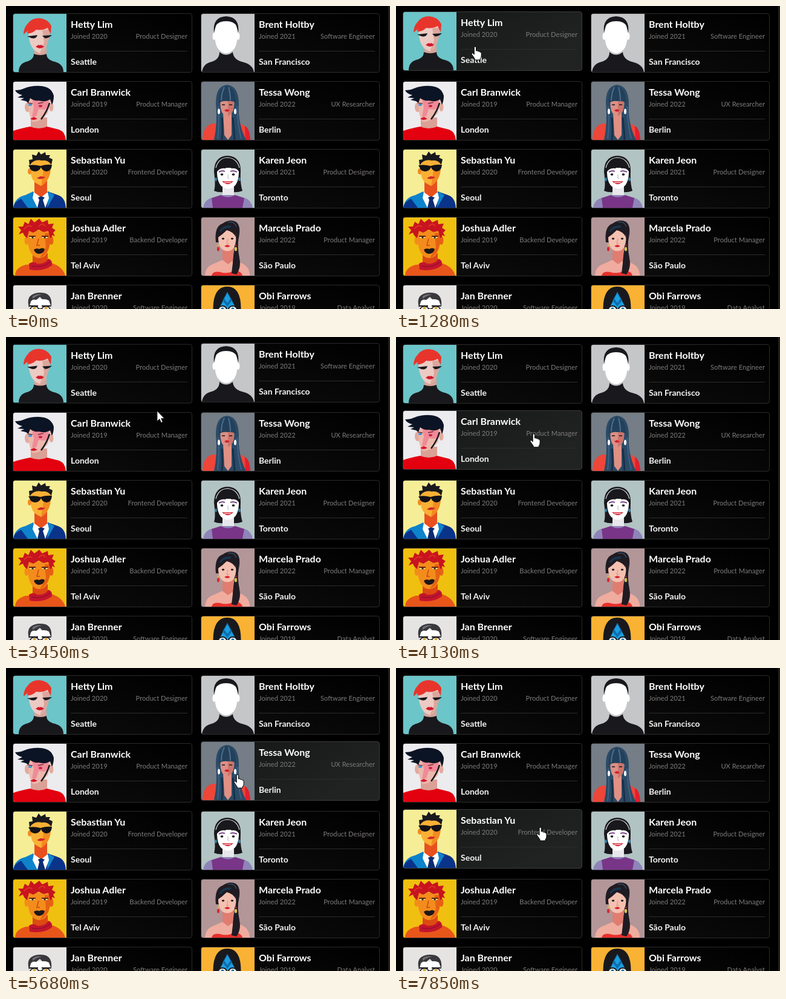
Animation of 635 by 500 pixels, one loop 8 s. Source, as an HTML page:

```html
<!DOCTYPE html>
<html lang="en">
<head>
<meta charset="utf-8">
<title>Team</title>
<style>
html, body { margin: 0; width: 100%; height: 100%; overflow: hidden; background: #000; }
svg { display: block; font-family: Lato, sans-serif; }
.name { font-size: 16px; font-weight: 700; fill: #fff; }
.note { font-size: 11.2px; fill: #7e7a7a; }
.city { font-size: 14px; font-weight: 700; fill: #f4f4f4; }
</style>
</head>
<body>
<svg id="stage" width="635" height="500" viewBox="0 0 635 500">
  <defs>
    <linearGradient id="rest" x1="0" y1="1" x2="1" y2="0">
      <stop stop-color="#0e0e0e"/><stop offset="1" stop-color="#000"/>
    </linearGradient>
    <linearGradient id="lit" x1="0.2" y1="0" x2="1" y2="0.5">
      <stop stop-color="#161818"/><stop offset="1" stop-color="#202322"/>
    </linearGradient>
    <clipPath id="photo"><path d="M100 13H15Q12 13 12 16V106Q12 109 15 109H100Z"/></clipPath>
  </defs>
  <rect width="635" height="500"/>
  <rect x="632" width="3" height="500" fill="#1d1f1e"/>
  <g id="cards"></g>
  <g id="cursor" fill="#fff" stroke="#000" stroke-linejoin="round">
    <path id="arrow" d="M0 0V17L4 13.3L6.7 19.3L9.3 18.2L6.7 12.3H12Z" stroke-width=".8"/>
    <path id="hand" d="M-2 13V1.5Q-2 0 -.4 0T1.3 1.5V7Q4 5.8 4.4 8Q7 7 7.4 9Q10 8.4 10 11V15Q10 18 8 20V22H-1V20L-6 12.8Q-6.8 11.3 -5 10.5Q-3.5 10.5 -2 13Z"/>
  </g>
</svg>
<script>
const LOOP = 8000, LIFT = 3, EASE = 600, DX = 311, DY = 112;
const $ = id => document.getElementById(id);

// drawing helpers for the portraits; coordinates are those of the first card
const p = (fill, d) => `<path fill="${fill}" d="${d}"/>`;
const l = (stroke, w, d) => `<path fill="none" stroke="${stroke}" stroke-width="${w}" d="${d}"/>`;
const e = (fill, x, y, rx, ry = rx) => `<ellipse fill="${fill}" cx="${x}" cy="${y}" rx="${rx}" ry="${ry}"/>`;
const bg = fill => p(fill, 'M12 13H100V109H12Z');
const ink = '#19191d';

const portraits = [
  bg('#6cc5c9') + p('#d9a398', 'M47 64H67V84H47Z') +
    p('#ebcbc4', 'M37 40Q37 64 48 74L56 78Q70 70 72 42L68 32H45Z') +
    p('#dca69c', 'M60 40L73 38Q72 66 56 78L63 60Z') +
    p('#e8352c', 'M29 47Q29 36 36 29Q42 20 55 20Q69 21 75 33L74 46Q71 41 69 36Q60 41 50 39Q43 46 35 45L36 41Q32 44 29 47Z') +
    p(ink, 'M35 50L52 48Q50 55 42 53ZM60 49L76 48Q70 54 64 53Z') +
    p('#d0182c', 'M49 67L54 64L56 65L58 64L63 67Q56 73 49 67Z') +
    p(ink, 'M21 109Q21 96 33 92Q46 89 46 79Q57 83 67 79Q67 89 81 92Q95 96 95 109Z'),

  bg('#c5c6c8') + p('#fff', 'M34 36Q33 66 42 73Q53 83 64 73Q73 66 72 36L66 24H40Z') +
    e('#fff', 33, 50, 2.5, 6) + e('#fff', 73, 50, 2.5, 6) +
    p(ink, 'M33 44Q30 18 53 17Q76 18 73 44L70 33Q66 25 53 25Q40 25 36 33Z') +
    p(ink, 'M13 109Q15 95 29 92Q42 88 42 76Q53 85 64 76Q65 88 79 92Q97 96 99 109Z'),

  bg('#ecebee') + p('#dba096', 'M41 72H68V95H41Z') + e('#e2aa9e', 36, 55, 5, 8) + e('#e2aa9e', 75, 55, 3.5, 7) +
    p('#ebb9ad', 'M37 40Q36 68 44 79Q55 81 69 65L75 42Z') +
    p('#f08a98', 'M43 42L69 40Q74 55 64 59L54 58L50 70L43 71L46 55Z') +
    p('#0b1424', 'M15 27Q24 27 30 24Q43 19 57 20Q75 21 79 36Q79 45 76 51L73 42Q66 47 54 44Q46 45 40 40L37 48L33 45L24 43L30 40L19 39L27 35Q18 33 15 27Z') +
    l(ink, 2.6, 'M72 48Q68 62 58 75') + e('#2b96d8', 40, 51, 3, 1.8) + e('#c41c3c', 57, 53, 3, 1.8) +
    l('#77333e', 1.3, 'M36 48L44 49M53 49L62 47') +
    p('#d8182c', 'M40 74L46 71L52 74Q45 78 40 74Z') +
    p('#e3000f', 'M12 109V94Q24 90 40 87Q54 93 68 87L88 92Q98 96 99 109Z'),

  bg('#757d86') + p('#ee4638', 'M14 109Q14 87 30 82H76Q92 87 93 109Z') +
    p('#e31e2d', 'M84 86Q92 90 93 109H85Z') +
    p('#2b4a66', 'M33 109Q39 82 36 48Q36 20 54 18Q73 19 74 48Q72 82 86 109Z') +
    p('#e09084', 'M48 64H62V101L56 109L50 101Z') + p('#dc8f85', 'M44 39H66Q68 60 60 67Q54 72 48 66Q42 60 44 39Z') +
    p('#c9756c', 'M56 44H66Q68 62 56 70Z') +
    p('#23405a', 'M41 49Q39 23 54 20Q70 23 69 49Q66 44 55 45Q45 44 41 49Z') +
    l('#4a6f8f', 2, 'M50 22Q45 32 45 44M57 22Q60 32 60 44') + l('#3d6285', 2, 'M40 54Q42 84 39 107M71 54Q72 84 78 107') +
    l('#183049', 3, 'M46 72Q48 90 46 109M64 72Q66 90 67 109') +
    l(ink, 1.5, 'M46 51H51M58 51H63') + e('#fff', 41, 62, 2, 4.5) + e('#fff', 68, 62, 2, 4.5) +
    p('#d3202d', 'M50 60L54 58L59 60Q54 65 50 60Z'),

  bg('#f6ee96') + p('#e8501e', 'M47 64H68V92H47Z') +
    p('#fbb035', 'M40 37Q39 60 49 68L58 73Q71 65 74 34L67 28H47Z') +
    p('#f28b1f', 'M62 48L74 46Q72 65 58 73Z') + e('#f28b1f', 39, 49, 3, 5) +
    p(ink, 'M39 39L38 30L44 29L43 21L50 23L54 16L58 21L65 17L66 22L73 22L71 26L77 29L75 38Q69 29 59 31Q46 28 39 39Z') +
    p('#131216', 'M37 39Q47 37 57 40Q66 37 76 38Q75 49 67 49Q60 48 58 42Q55 49 48 49Q40 48 39 42Z') +
    p('#cf242b', 'M51 60L57 57L65 58Q59 64 51 60Z') +
    p('#0d83cc', 'M12 109Q14 92 32 88L45 82L62 109Z') + p('#0a338a', 'M69 82L86 88Q98 92 99 109H56Z') +
    p('#0a338a', 'M12 109Q14 98 25 94L36 109Z') + p('#0d83cc', 'M70 82L80 88L68 109Z') +
    p('#fff', 'M46 83L58 92L69 83L71 93L65 109H52L44 93Z') + p('#0b2c72', 'M53 92L58 90L64 92L61 96L65 109H52L55 96Z'),

  bg('#b2c3c3') + p(ink, 'M33 81Q36 72 33 50Q33 24 55 23Q78 24 77 50Q76 69 80 81Q70 85 56 82Q42 85 33 81Z') +
    p('#e8e7ec', 'M47 74H66V93H47Z') + p('#fff', 'M38 43H74Q75 65 67 73Q56 82 45 73Q37 65 38 43Z') +
    p(ink, 'M37 51V36Q55 23 75 36V51Q71 42 62 44L56 40L52 44Q42 42 37 51Z') +
    l('#d9dddd', 1.2, 'M36 43Q40 27 55 26Q71 27 75 43') +
    l('#6d327c', 1.8, 'M41 50Q46 47 51 49M60 49Q65 47 71 50') +
    e(ink, 46, 54, 2.4, 1.7) + e(ink, 65, 54, 2.4, 1.7) + l('#bfc1c8', 1.2, 'M56 54V60L58 61') +
    p('#d51c2c', 'M46 65Q55 66 65 65Q56 75 46 65Z') + l('#fff', 1.2, 'M50 67.500H61') +
    e('#2c8cb6', 36, 62, 1.7, 3) + e('#2c8cb6', 75, 62, 1.7, 3) +
    p('#8f84b9', 'M15 109Q17 95 31 92L45 88H67L82 92Q95 96 97 109Z') +
    p('#793587', 'M31 109L29 93L44 88Q56 95 68 88L83 93L80 109Z'),

  bg('#f0c010') + p('#dd4a12', 'M44 72H69V94H44Z') +
    p('#f38c1c', 'M36 35Q34 66 45 76Q55 84 65 76Q74 66 74 35Z') +
    p('#e66114', 'M64 39H74Q75 72 56 80L66 62Z') + e('#f38c1c', 34, 51, 3.5, 7) + e('#e66114', 75, 51, 3.5, 7) +
    p('#c8141e', 'M35 47Q30 44 28 38L21 41L25 34L20 28L28 28L31 20L37 24L41 15L47 21L55 15L60 21L69 17L70 24L79 23L76 30L82 34L78 38L81 44L76 42Q77 46 73 47L70 35L62 37L54 33L45 38L38 35Z') +
    l('#e63827', 1.5, 'M30 32Q36 24 43 28M54 28Q61 20 65 28') +
    p('#fff0b4', 'M38 45H49Q43 50 38 45ZM59 45H70Q64 50 59 45Z') + e('#35371b', 44, 46, 1.8) + e('#35371b', 64, 46, 1.8) +
    l('#6b210e', 1.8, 'M38 44H49M59 44H70') + l('#c94a10', 1.5, 'M54 48L51 59H56') +
    p('#1c1719', 'M46 66Q50 63 55 65Q60 62 64 65Q62 73 54 73Q48 72 46 66Z') +
    p('#e8561a', 'M15 109Q15 96 32 91L75 88Q94 94 98 109Z') +
    p('#c4142c', 'M38 89Q46 84 51 89Q64 91 70 81Q77 83 76 92Q61 103 39 99Z') + l('#8c1230', 1.5, 'M42 93Q61 97 73 86'),

  bg('#b29698') + p('#e07c70', 'M47 62H65V91H47Z') +
    p('#efac9f', 'M18 109Q19 94 31 90L47 83L56 90L66 83L80 89Q92 95 92 109Z') +
    p('#201b22', 'M36 54Q33 28 47 23Q59 15 69 20Q78 26 74 46Q71 58 75 80Q78 100 66 107Q62 90 67 62L60 36Q46 36 41 54Z') +
    p('#f4c0b0', 'M40 42Q47 40 51 34L64 32L69 42Q71 58 63 66Q55 71 47 66Q39 59 40 42Z') +
    p('#201b22', 'M38 47Q37 30 51 27L64 30Q69 36 69 45Q64 36 54 34Q46 42 38 47Z') +
    l('#17364f', 3.5, 'M43 36Q48 27 61 28') + l('#32566f', 1.3, 'M56 21Q66 18 70 28') +
    e(ink, 48, 48, 2.2, 1.4) + e(ink, 63, 48, 2.2, 1.4) +
    l('#d99082', 1, 'M56 48L54 56H58') + p('#d7222f', 'M50 60L55 58L60 60Q55 64 50 60Z') +
    e('#d9242e', 40, 65, 2, 3.5) + e('#e7c63a', 69, 65, 2, 3.5) + e('#e7c63a', 40, 59, 1.3) + e('#d9242e', 69, 59, 1.3) +
    p('#e8302c', 'M29 109Q31 101 43 103Q55 107 65 101Q78 100 80 109Z') +
    p('#201b22', 'M65 80L74 77Q79 95 70 107L62 105Z'),

  bg('#e5e4e2') + p('#fff', 'M39 36H74V74Q56 88 39 73Z') +
    p('#39383c', 'M38 50Q34 34 42 29Q51 23 65 26Q77 30 75 49L71 38Q65 35 60 36L56 32L50 37Q43 35 41 40Z') +
    p('#737277', 'M44 31Q51 26 60 28Q52 29 44 35Z') +
    e('#1b1a1d', 47, 53, 8, 6) + e('#1b1a1d', 66, 53, 8, 6) + e('#fff', 47, 53, 6, 4.5) + e('#fff', 66, 53, 6, 4.5) +
    l('#1b1a1d', 2, 'M38 47H53M59 47H74M54 52H59') + e('#d9a53b', 47, 51, 2.5) + e('#d9a53b', 66, 51, 2.5),

  bg('#f9b233') + p(ink, 'M32 64Q28 15 55 15Q81 15 77 64Z') +
    p('#1b9ee0', 'M40 54L55 24L71 54V75H40Z') + p('#0c6eaf', 'M55 24L63 38L55 48L47 38Z') +
    p('#1b9ee0', 'M55 26L60 35L55 42L50 35Z') +
    e('#1a191c', 47, 53, 8, 7) + e('#1a191c', 64, 53, 8, 7) + e('#e8f5fa', 47, 53, 6, 5) + e('#e8f5fa', 64, 53, 6, 5) +
    e('#1b6f9f', 47, 52, 2.5) + e('#1b6f9f', 64, 52, 2.5),
];

const people = [
  ['Hetty Lim', 2020, 'Product Designer', 'Seattle'],
  ['Brent Holtby', 2021, 'Software Engineer', 'San Francisco'],
  ['Carl Branwick', 2019, 'Product Manager', 'London'],
  ['Tessa Wong', 2022, 'UX Researcher', 'Berlin'],
  ['Sebastian Yu', 2020, 'Frontend Developer', 'Seoul'],
  ['Karen Jeon', 2021, 'Product Designer', 'Toronto'],
  ['Joshua Adler', 2019, 'Backend Developer', 'Tel Aviv'],
  ['Marcela Prado', 2022, 'Product Manager', 'São Paulo'],
  ['Jan Brenner', 2020, 'Software Engineer', ''],
  ['Obi Farrows', 2019, 'Data Analyst', ''],
];

$('cards').innerHTML = people.map(([name, year, role, city], i) => {
  const end = 300 - i % 2;
  return `<g><rect x="11.5" y="12.5" width="${296 - i % 2}" height="97" rx="3.5" stroke="#2b2b2b"/>
    <g clip-path="url(#photo)">${portraits[i]}</g>
    <text class="name" x="107" y="36">${name}</text>
    <text class="note" x="107" y="54">Joined ${year}</text>
    <text class="note" x="${end}" y="54" text-anchor="end">${role}</text>
    <path d="M107 74.5H${end}" stroke="#2c2c2c"/>
    <text class="city" x="107" y="97">${city}</text></g>`;
}).join('');
const cards = [...$('cards').children];

// pointer path: time, x, y
const path = [
  [100, 345, 505], [400, 250, 260], [600, 180, 100], [840, 150, 74], [940, 150, 74],
  [1280, 131, 67], [1740, 228, 62], [2010, 315, 70], [2460, 377, 77], [2560, 386, 76],
  [3000, 370, 86], [3250, 312, 100], [3350, 264, 113], [3450, 250, 122], [3800, 220, 150],
  [4370, 234, 167], [4520, 234, 167], [4960, 334, 163], [5320, 382, 176], [5920, 384, 176],
  [6650, 328, 182], [6750, 312, 198], [6770, 309, 200], [7100, 255, 238], [7510, 229, 262],
  [7610, 229, 262], [7850, 239, 263], [LOOP, 239, 263],
];

function pointer(t) {
  const i = path.findIndex(k => k[0] > t);
  if (i < 1) return null;
  const [t0, x0, y0] = path[i - 1], [t1, x1, y1] = path[i], f = (t - t0) / (t1 - t0);
  return [x0 + (x1 - x0) * f, y0 + (y1 - y0) * f];
}

function cardAt(pos) {
  if (!pos) return -1;
  const col = pos[0] >= 322 ? 1 : 0, row = Math.floor((pos[1] - 12) / DY);
  const x = pos[0] - col * DX, y = pos[1] - row * DY;
  return x >= 11 && x < 308 && y >= 12 && y < 110 ? row * 2 + col : -1;
}

// every enter (+1) and leave (-1) along the path
const visits = [];
for (let t = 0, last = -1; t < LOOP; t += 5) {
  const now = cardAt(pointer(t));
  if (now === last) continue;
  if (last >= 0) visits.push([last, t, -1]);
  if (now >= 0) visits.push([now, t, 1]);
  last = now;
}

const smooth = f => { f = Math.min(1, Math.max(0, f)); return f * f * (3 - 2 * f); };

function draw(now) {
  const t = now % LOOP, pos = pointer(t), over = cardAt(pos);
  cards.forEach((card, i) => {
    const up = visits.reduce((sum, [c, at, dir]) => c === i ? sum + dir * smooth((t - at) / EASE) : sum, 0);
    card.setAttribute('transform', `translate(${i % 2 * DX} ${(i >> 1) * DY - LIFT * up})`);
    card.firstChild.setAttribute('fill', `url(#${i === over ? 'lit' : 'rest'})`);
    card.firstChild.setAttribute('stroke', i === over ? '#3a3c3b' : '#2b2b2b');
  });
  $('cursor').style.display = pos ? '' : 'none';
  if (pos) $('cursor').setAttribute('transform', `translate(${pos})`);
  $('hand').style.display = over < 0 ? 'none' : '';
  $('arrow').style.display = over < 0 ? '' : 'none';
}

const start = performance.now();
function tick() {
  draw(performance.now() - start);
  requestAnimationFrame(tick);
}
tick();
</script>
</body>
</html>
```
